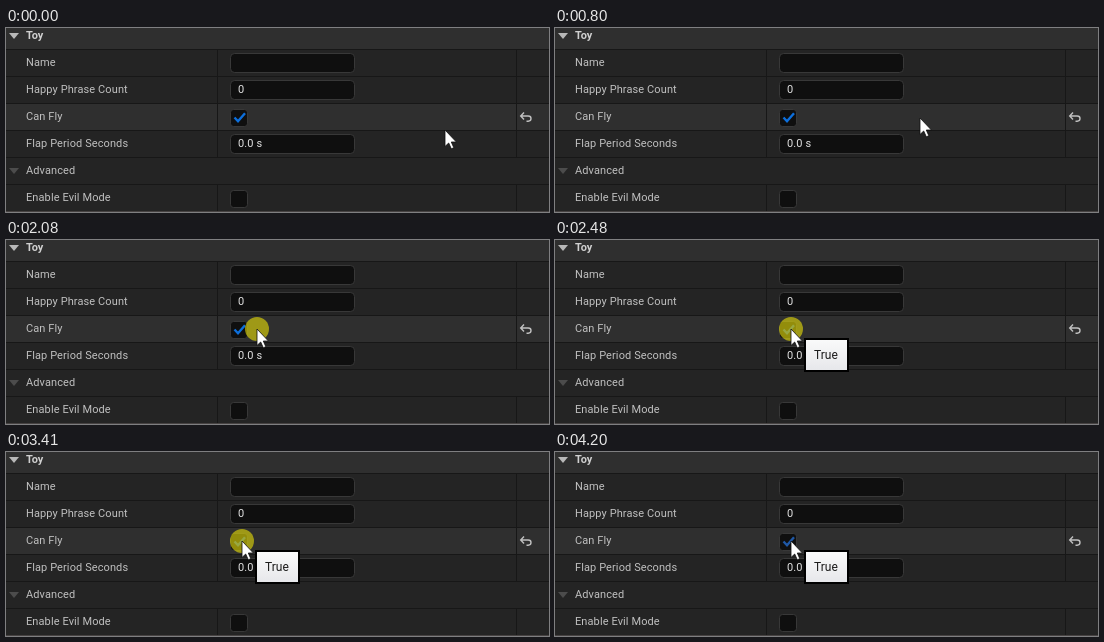
An HTML page for the animation above (5.41 s loop, 543x184 px).

```html
<!DOCTYPE html>
<html lang="en">
<head>
<meta charset="utf-8">
<title>Toy details panel</title>
<style>
  html, body { margin: 0; width: 100%; height: 100%; overflow: hidden; background: #242424; }
  svg { display: block; width: 543px; height: 184px; }
  text { font: 11px Roboto, sans-serif; letter-spacing: .1px; fill: #c0c0c0; }
  .bold { font-weight: 700; letter-spacing: 0; fill: #d0d0d0; }
  .value { fill: #e4e4e4; }
  .field { fill: #0f0f0f; stroke: #383838; }
  .line { fill: #171717; }
  .raised { fill: #2f2f2f; }
  .disabled text { fill: #5c5c5c; }
  .disabled .field { fill: #1a1a1a; stroke: #2d2d2d; }
  #check { fill: none; stroke: #0d6fdc; stroke-width: 2.4; }
  #check.hover { stroke: #1f58a6; }
  #tip text { font-size: 12px; letter-spacing: 0; fill: #1c1c1c; }
</style>
</head>
<body>
<svg viewBox="0 0 543 184">
  <defs>
    <linearGradient id="paper" x2="0" y2="1">
      <stop stop-color="#fafafa"/><stop offset="1" stop-color="#e6e7ea"/>
    </linearGradient>
  </defs>
  <g id="panel"></g>
  <circle id="press" r="12" fill="#e1d70a" fill-opacity=".63"/>
  <g id="tip">
    <rect id="tipBox" x="1" y="1" height="32" fill="url(#paper)" stroke="#000" stroke-width="2"/>
    <text id="tipText" x="10" y="21"></text>
  </g>
  <path id="cursor" d="M0 0V16.5L3.7 13 6.3 18.8 8.8 17.7 6.3 12H11.4Z" fill="#fff" stroke="#111" stroke-width=".8"/>
</svg>
<script>
const LOOP = 5410;
const $ = id => document.getElementById(id);

const label = (text, y, cls = '') => `<text x="20" y="${y}" class="${cls}">${text}</text>`;
const rect = (x, y, w, h, cls) => `<rect x="${x}" y="${y}" width="${w}" height="${h}" class="${cls}"/>`;
const box = (y, w, h, r) =>
  `<rect x="224.5" y="${y}.5" width="${w}" height="${h}" rx="${r}" class="field"/>`;
const input = (top, value) => box(top + 3, 124, 19, 4) +
  `<text x="232" y="${top + 16}" class="value">${value}</text>`;
const checkbox = top => box(top + 5, 17, 17, 3);
const expander = (y, fill) => `<path d="M3 ${y}h10l-5 6z" fill="${fill}"/>`;
const columns = top => rect(211, top, 1, 26, 'line') + rect(510, top, 1, 26, 'line');
const row = (top, name, content) => columns(top) + label(name, top + 16) + content;

$('panel').innerHTML =
  rect(0, 0, 543, 21, 'raised') + rect(0, 76, 543, 26, 'raised') +
  [21, 48, 75, 102, 129, 156].map(y => rect(0, y, 543, 1, 'line')).join('') +
  '<rect y="183" width="543" height="1" fill="#464242"/>' +
  expander(5, '#b8b8b8') + label('Toy', 11, 'bold') +
  row(22, 'Name', input(22, '')) +
  row(49, 'Happy Phrase Count', input(49, '0')) +
  row(76, 'Can Fly', checkbox(76) +
    '<path id="check" d="M228.5 89.5l3.5 3.7 7-8"/>' +
    '<path id="reset" d="M518 84.5l-3.3 3.5 3.3 3.5M515 88h7.2q2.8 0 2.8 2.6t-2.8 2.6h-1.7" fill="none" stroke="#c0c0c0" stroke-width="1.4"/>') +
  `<g id="period">${row(103, 'Flap Period Seconds', input(103, '0.0 s'))}</g>` +
  expander(140, '#4c4c4c') + label('Advanced', 146) +
  row(157, 'Enable Evil Mode', checkbox(157));

// Pointer positions, each held until the next: [ms, x, y]
const pointer = [
  [0, 439, 102], [530, 437, 102], [600, 432, 101], [670, 420, 99], [730, 396, 95],
  [800, 365, 90], [880, 310, 86], [950, 288, 85], [1010, 272, 86], [1140, 260, 88],
  [1210, 253, 89], [1410, 252, 89], [1480, 251, 89], [2280, 244, 89], [2340, 236, 89]
];
const presses = [[2080, 2210], [2480, 2610], [2940, 3140], [3410, 3610], [4010, 4200]];
const toggles = [2670, 3070, 3550, 4140];

const show = (id, on) => $(id).setAttribute('visibility', on ? 'visible' : 'hidden');
const place = (id, x, y) => $(id).setAttribute('transform', `translate(${x} ${y})`);

function draw(t) {
  const [, x, y] = pointer.findLast(([start]) => t >= start);
  const canFly = toggles.filter(start => t >= start).length % 2 === 0;
  const hovering = t >= 2280;

  $('panel').style.display = t >= 390 && t < 460 ? 'none' : '';
  show('check', canFly);
  show('reset', canFly);
  $('check').classList.toggle('hover', hovering);
  $('period').classList.toggle('disabled', !canFly);

  place('cursor', x, y);
  place('press', x, y);
  show('press', presses.some(([start, end]) => t >= start && t < end));

  place('tip', x + 13, y + 9);
  show('tip', hovering);
  $('tipText').textContent = canFly ? 'True' : 'False';
  $('tipBox').setAttribute('width', canFly ? 43 : 48);
}

const began = performance.now();
function tick() {
  draw((performance.now() - began) % LOOP);
  requestAnimationFrame(tick);
}
tick();
</script>
</body>
</html>
```
